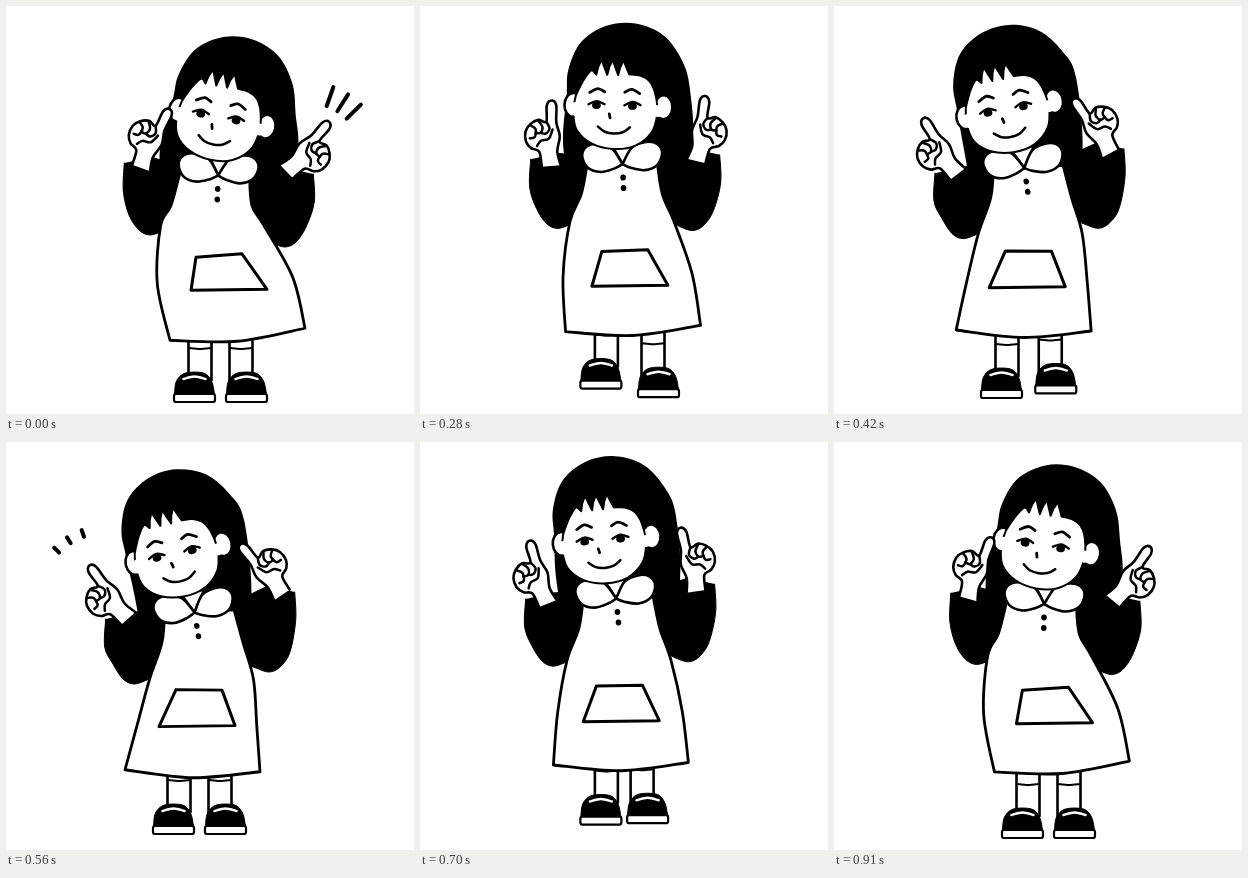
An HTML page with a canvas for the animation above (980 ms loop, 408x408 px).

```html
<!DOCTYPE html>
<html lang="en">
<head>
<meta charset="utf-8">
<title>Pointing girl</title>
<style>
html, body { margin: 0; width: 100%; height: 100%; overflow: hidden; background: #fff; }
canvas { display: block; width: 408px; height: 408px; }
</style>
</head>
<body>
<canvas id="stage" width="408" height="408"></canvas>
<script>
const g = document.getElementById('stage').getContext('2d');
const STEP = 70, STEPS = 14, TURN = Math.PI * 2;

// step, sway (-1 left to 1 right), height of the eyes
const keys = [
  [0, 1, 110.5], [2, .73, 107], [4, .18, 99], [6, -.86, 103],
  [8, -1, 111.5], [10, -.36, 97.5], [13, .84, 103], [14, 1, 110.5]
];

function bodyAt(n) {
  const i = keys.findIndex(k => k[0] > n), a = keys[i - 1], b = keys[i];
  const k = (n - a[0]) / (b[0] - a[0]);
  const sway = a[1] + (b[1] - a[1]) * k, y = a[2] + (b[2] - a[2]) * k;
  return { sway, y, cx: 201 + 12.5 * sway, cy: y + 52, tilt: .2 * sway - .01 };
}

// Weight shift of a foot: rests at both ends, quick in between
const shift = n => Math.max(-1, Math.min(1, 2 * Math.cos(n / STEPS * TURN) + .72));

const pairs = a => a.reduce((r, v, i) => (i % 2 ? r[r.length - 1].push(v) : r.push([v]), r), []);

// Smooth curve through points
function curve(path, pts, join) {
  if (join) path.lineTo(...pts[0]); else path.moveTo(...pts[0]);
  for (let i = 0; i < pts.length - 1; i++) {
    const p = pts[i - 1] || pts[i], a = pts[i], b = pts[i + 1], q = pts[i + 2] || b;
    path.bezierCurveTo(a[0] + (b[0] - p[0]) / 6, a[1] + (b[1] - p[1]) / 6,
      b[0] - (q[0] - a[0]) / 6, b[1] - (q[1] - a[1]) / 6, b[0], b[1]);
  }
  return path;
}
const smooth = (...a) => curve(new Path2D(), pairs(a));

function oval(x, y, rx, ry) {
  const p = new Path2D();
  p.ellipse(x, y, rx, ry, 0, 0, TURN);
  return p;
}
function line(path, width = 2.5) {
  g.lineWidth = width;
  g.stroke(path);
}
function shape(path, fill = '#fff', width = 2.6) {
  g.fillStyle = fill;
  g.fill(path);
  if (width) line(path, width);
}
function place(x, y, turn, draw, flip = 1) {
  g.save();
  g.translate(x, y);
  g.rotate(turn);
  g.scale(flip, 1);
  draw();
  g.restore();
}

function hair({ sway, cx, cy, y, tilt }) {
  const c = Math.cos(tilt), s = Math.sin(tilt), hx = 190.5 + 22 * sway;
  const dome = pairs([-48, -8, -47, -34, -35, -62, -10, -79, 19, -82, 47, -71, 66, -47, 75, -18])
    .map(([u, v]) => [hx + u * c - v * s, y + u * s + v * c]);
  shape(curve(new Path2D(), [[cx - 48, cy + 55], [cx - 60, cy - 10], ...dome,
    [cx + 67 + 10 * sway, cy - 10], [cx + 48, cy + 60]]), '#000', 0);
}

function sleeve({ sway, y, cx, cy }, side) {
  const lean = side * sway;
  const x = 203.5 + side * 94.5 + 9.3 * sway, top = y + 52 - side * 4 + 9.5 * lean;
  const ex = 203.5 + side * 67.5 + 8 * sway, ey = y + 124.5 + 6 * lean;
  const p = curve(new Path2D(), [[x, top], [x + side, top + 28], [ex + side * 21, ey - 20],
    [ex + side * 11, ey - 5], [ex, ey], [ex - side * 13, ey - 4]]);
  p.lineTo(cx + side * 28, cy + 50);
  p.lineTo(cx + side * 33, cy);
  p.lineTo(x - side * 27, top - 6);
  shape(p, '#000', 1);
}

function arm({ sway, y }, side) {
  const x = 202 + side * 83 + 21 * sway, dy = 30 - side * 4 + 12.5 * side * sway;
  place(x, y + dy, -.04 + side * .09 + (.62 + side * .08) * sway, hand, -side);
}

function foot(n, side) {
  const s = shift(side < 0 ? n : n - .6);
  const x = 204 + side * 26 + 10.5 * s, y = 395 + 2 * s - 13 * (1 - s * s), lean = x - side * 5.5;
  const leg = new Path2D();
  leg.rect(lean - 11.5, y - 85, 23, 62);
  shape(leg);
  line(smooth(lean - 11, y - 55, lean, y - 54, lean + 11, y - 55), 2);
  shape(smooth(x - 20, y - 9, x - 18, y - 22, x - 9, y - 30, x + 9, y - 30, x + 17, y - 22, x + 20, y - 9), '#000', 1);
  g.strokeStyle = '#fff';
  line(smooth(x - 11, y - 24, x, y - 26.5, x + 11, y - 24));
  g.strokeStyle = '#000';
  const sole = new Path2D();
  sole.roundRect(x - 20.5, y - 9, 41, 8, 2);
  shape(sole, '#fff', 2.2);
}

function dress({ sway: s, y, cx, cy }) {
  const hemX = 209 + 22.5 * s, hemY = 325 + (y - 104) / 2, slope = 2.5 + 3.5 * s;
  const p = new Path2D();
  const edge = (side, hem) => {
    const waist = [cx + side * 52 - 7 * s, cy + 66 - 8 * s];
    const mid = [(waist[0] + hem[0]) / 2 + side * (4 + 4 * s), (waist[1] + hem[1]) / 2];
    return [[cx + side * 35 - 5 * s, cy + 6], [cx + side * 40.5 - 8 * s, cy + 37], waist, mid, hem];
  };
  const left = [hemX - 67.5, hemY + slope], right = [hemX + 67.5, hemY - slope];
  curve(p, edge(-1, left));
  curve(p, [left, [hemX, hemY + 7], right], true);
  curve(p, edge(1, right).reverse(), true);
  shape(p, '#fff', 2.8);

  const px = 205 + 13 * s, py = 264 + (y - 104) * .35, box = new Path2D();
  pairs([-25 - 3 * s, -17 + 2 * s, 21 - 3 * s, -18.5, 40 + 3 * s, 17, -36 + 3 * s, 18])
    .forEach(([u, v]) => box.lineTo(px + u, py + v));
  box.closePath();
  line(box, 3);
}

function collar() {
  shape(new Path2D('M-12-14L-1 7L12-14Z'));
  for (const side of [-1, 1]) place(-1, 0, 0, () => {
    shape(smooth(0, 7, 8, 11, 22, 14, 35, 9, 40, -3, 35, -12, 24, -14, 10, -9, 0, 7));
  }, side);
  for (const y of [20.5, 31]) shape(oval(-1, y, 2.8, 3), '#000', 0);
}

function head() {
  shape(oval(-41, 1, 9, 12));
  shape(oval(49, 1, 9, 12));
  const face = smooth(-39, -8, -41, 8, -37, 26, -22, 39, 0, 44, 22, 40, 38, 26, 43, 8, 42, -6);
  curve(face, pairs([42, -6, 39, -17, 34, -25, 25, -30, 14, -31]), true);
  // Fringe: notches between pointed locks
  for (let x = 10; x > -20; x -= 11) {
    face.quadraticCurveTo(x + 1, -37, x - 2, -45);
    face.quadraticCurveTo(x - 6, -38, x - 7, -30);
  }
  curve(face, pairs([-19, -30, -24, -34, -31, -25, -36, -15, -39, -8]), true);
  shape(face, '#fff', 2);
  shape(oval(-39, 5, 6, 7), '#fff', 0);
  shape(oval(43, 5, 6, 6), '#fff', 0);

  for (const side of [-1, 1]) {
    shape(oval(side * 18, .8, 4.4, 3.6), '#000', 0);
    line(smooth(side * 18 - 8, 0, side * 18, -3.4, side * 18 + 8, -.5), 2.4);
    line(smooth(side * 10, -13, side * 17, -16, side * 25, -12), 2.8);
  }
  line(smooth(-5, 9, -4, 13), 2.8);
  line(smooth(-16, 22, -9, 27, 0, 28.5, 9, 27, 16, 22));
}

function hand() {
  shape(smooth(-2, 30, -4, 15, -12, 11, -17, 4, -17, -6, -12, -13, -4, -17, 4, -15,
    5, -31, 10, -36, 14.5, -31, 14, -14, 17, 0, 14, 15, 17, 29));
  line(smooth(4, -15, 7, -8, 3, -3, -2, -4));
  line(smooth(-4, -16, 0, -10, -2, -4, -7, -4));
  line(smooth(-12, -12, -7, -8, -8, 0, -13, 1));
  line(smooth(10, -7, 6, 2, -2, 4, -6, 9));
}

// Three rays fanned around the pointing hand, shrinking outwards
function sparks(n) {
  const length = [20, 7, 1][n % 7];
  if (!length) return;
  const side = n < 7 ? 1 : -1;
  place(201.5 + side * 101.5, side > 0 ? 150 : 157, 0, () => {
    for (let i = 0; i < 3; i++) {
      const a = .34 + i * .225, x = Math.sin(a), y = -Math.cos(a), r = 73;
      line(smooth(x * r, y * r, x * (r - length), y * (r - length)), 4);
    }
  }, side);
}

function draw(n) {
  const b = bodyAt(n);
  g.fillStyle = '#fff';
  g.fillRect(0, 0, 408, 408);
  g.strokeStyle = '#000';
  g.lineCap = g.lineJoin = 'round';
  hair(b);
  for (const side of [-1, 1]) {
    sleeve(b, side);
    foot(n, side);
  }
  dress(b);
  place(b.cx, b.cy, .1 * b.sway - .06, collar);
  place(190.5 + 22 * b.sway, b.y, b.tilt, head);
  arm(b, -1);
  arm(b, 1);
  sparks(n);
}

let shown = -1;
const start = performance.now();
function tick() {
  const n = Math.floor((performance.now() - start) / STEP) % STEPS;
  if (n !== shown) draw(shown = n);
  requestAnimationFrame(tick);
}
tick();
</script>
</body>
</html>
```
